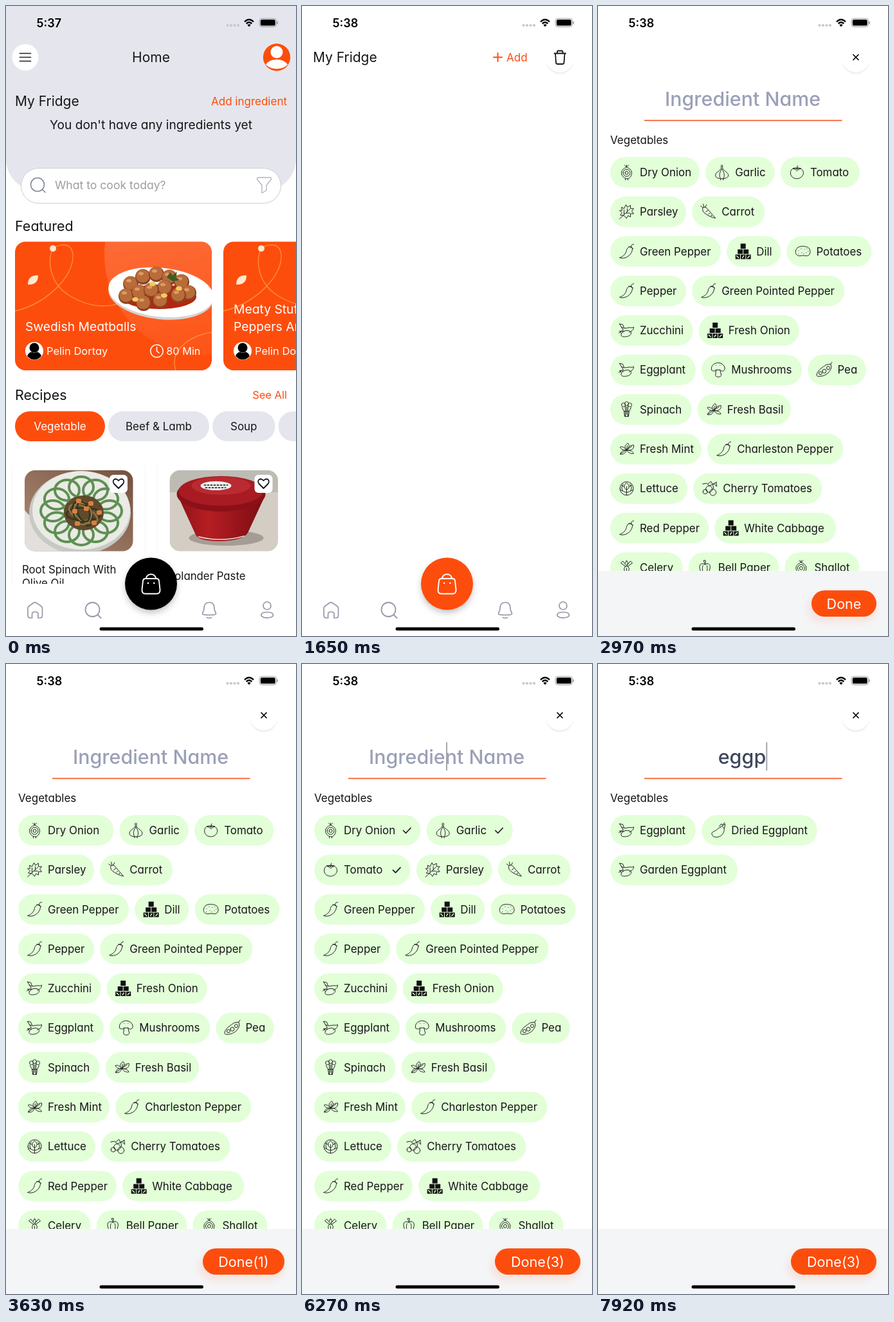
Recreate the animation shown at these times as an HTML page. Size 451 by 977 pixels, loop 8 s.

```html
<!DOCTYPE html>
<html lang="en">
<head>
<meta charset="utf-8">
<title>Recipe app</title>
<style>
  html, body { margin: 0; width: 100%; height: 100%; overflow: hidden; background: #fff; }
  svg { display: block; width: 100vw; height: 100vh; }
  text { font-family: Inter, sans-serif; font-feature-settings: "cv11"; white-space: pre; }
</style>
</head>
<body>
<svg id="stage" viewBox="0 0 451 977"></svg>
<script>
const LOOP = 8000, STEP = 330;
const ORANGE = '#fd4d0d', PALE = '#e5e6ed', INK = '#161618', GRAY = '#9698a8', CHIP = '#e2ffd8';

// Drawing helpers
const rect = (x, y, w, h, r, fill, extra = '') =>
  `<rect x="${x}" y="${y}" width="${w}" height="${h}" rx="${r}" fill="${fill}" ${extra}/>`;
const circle = (x, y, r, fill, extra = '') => `<circle cx="${x}" cy="${y}" r="${r}" fill="${fill}" ${extra}/>`;
const ellipse = (x, y, rx, ry, fill, extra = '') =>
  `<ellipse cx="${x}" cy="${y}" rx="${rx}" ry="${ry}" fill="${fill}" ${extra}/>`;
const line = (d, color, width = 1.8, extra = '') =>
  `<path d="${d}" fill="none" stroke="${color}" stroke-width="${width}" stroke-linecap="round" stroke-linejoin="round" ${extra}/>`;
const shape = (d, fill, extra = '') => `<path d="${d}" fill="${fill}" ${extra}/>`;
const text = (x, y, str, size, fill = INK, anchor = 'start', weight = 400) =>
  `<text x="${x}" y="${y}" font-size="${size}" fill="${fill}" text-anchor="${anchor}" font-weight="${weight}">${str}</text>`;
const move = (x, y, body) => `<g transform="translate(${x} ${y})">${body}</g>`;
const clipped = (id, body) => `<g clip-path="url(#${id})">${body}</g>`;
const ring = (x, y, r) => `M${x - r} ${y}a${r} ${r} 0 1 0 ${2 * r} 0a${r} ${r} 0 1 0 ${-2 * r} 0`;
const blur = 'filter="url(#blur)"';

const defs = `<defs>
  <filter id="blur" x="-50%" y="-80%" width="200%" height="260%"><feGaussianBlur stdDeviation="6"/></filter>
  <clipPath id="feature">${rect(14, 365.5, 306, 199.5, 16, '#000')}</clipPath>
  <clipPath id="photo">${rect(0, 0, 168.5, 125.5, 16, '#000')}</clipPath>
  <linearGradient id="sheen" x1=".3" y1="0" x2=".5" y2="1">
    <stop stop-color="#fff" stop-opacity=".24"/><stop offset="1" stop-color="#fff" stop-opacity=".04"/>
  </linearGradient>
  <linearGradient id="table" x1="1" y1="0" x2="0" y2="1"><stop stop-color="#75503f"/><stop offset="1" stop-color="#b08f78"/></linearGradient>
  <linearGradient id="pot" x1="0" x2="1"><stop stop-color="#8e1118"/><stop offset=".35" stop-color="#b51e22"/><stop offset="1" stop-color="#7c0c14"/></linearGradient>
</defs>`;

// Ingredient icons, centred on 0,0
const icons = {
  onion: ring(0, 1, 5.5) + ring(0, 1, 2.5) + 'M0-8C-4-6-8-4-8 1S-4 9 0 10S8 6 8 1S4-6 0-8M-3-11L0-8L3-11M0-8V-11M-2 10V12M2 10V12',
  garlic: 'M-1-11V-6C-3-2-10 0-10 5C-10 9-4 10 0 10S10 9 10 5C10 0 3-2 1-6V-11M0-5C-5 1-4 8-2 10M0-5C5 1 4 8 2 10M-2 10V12M2 10V12',
  tomato: 'M0-5C-5-8-10-5-10 1S-5 10 0 10S10 6 10 1S5-8 0-5M1-10L0-5M-6-6L0-7L6-6L2-4L0-2L-2-4Z',
  leaf: 'M-11 11L5-4M-4 6L-10 5L-7 2L-11-2L-7-2L-8-7L-4-5L-1-11L1-7L6-10L6-5L11-5L8-1L11 3L6 3L6 8L2 6L0 10ZM-4 4V-3M1 0V-5M-1 2H5',
  carrot: 'M-9-5C-8-8-4-8-2-5L11 10C5 9-5 4-8 0ZM-8-6L-12-9M-7-7L-8-12M-5-7L-3-11M-4 0L-1-2M0 4L2 2M4 7L5 5',
  pepper: 'M7-6C5-8 1-6 0-2C-1 4-5 8-11 10C-2 13 8 6 9-3C9-5 8-6 7-6M3-7C4-8 9-7 10-4M7-7C7-9 8-11 11-11',
  potato: 'M-8-6C-4-9 6-8 9-5C13 0 11 7 6 7C2 7 0 6-4 7C-14 8-13-3-8-6M-7-1h.1M-3-4h.1M-2 2h.1M2-3h.1M6-4h.1M5 2h.1M8 0h.1M-7 4h.1M1 4h.1',
  eggplant: 'M-11-10L-8-5C-5-3-2-3 2-4C6-5 8-3 11-5C11 0 7 2 4 3M-11-10L-6-9L-4-4M-8-5L-5 0M-5 2C-1-1 7 0 7 4S2 10-4 10S-10 5-5 2M-5 2L-11 1L-8 5M-6 0L-12 4',
  mushroom: 'M-10 0C-12-6-6-11 0-11S12-6 10 0C8 3 5 2 3 0H-3C-5 2-8 3-10 0M-3 0L-4 8C-4 12 5 12 5 8L3 0M-3-7h.1M3-7h.1',
  pea: 'M-12 8C-11 0-2-4 3-8L10-9L11-4C9 5 0 11-10 10ZM10-9L12-12' + ring(-6, 5, 2.5) + ring(0, 2, 3) + ring(6, -3, 2.5),
  spinach: ring(-5, -7, 3) + ring(0, -9, 3) + ring(5, -7, 3) + 'M-7-3L-4 3L-3 11H3L4 3L7-3M-2-5V11M2-5V11M0-4V8M-4 3H4',
  basil: 'M0 2C-4-2-3-6 2-9C5-5 4-2 0 2C3-4 7-6 11-6C12 0 7 3 0 2C-5 1-8 3-10 8C-5 9-2 7 0 2C3 6 7 8 11 7C9 3 5 2 0 2C-4-3-7-4-10-3C-9 1-5 2 0 2M-10 8L8-4M0 2L1-5',
  lettuce: ring(0, 0, 10.5) + 'M0 10V-3M0 6C-9 6-9-3-5-7M0 6C9 6 9-3 5-7M0 2C-5 0-5-5 0-9C5-5 5 0 0 2M-10 2L-6 4M10 2L6 4M-8-5L-4-3M8-5L4-3',
  cherry: ring(-1, 1, 5) + ring(5, 6, 5) + ring(-7, 5, 3.5) + 'M11-10L0-4L-5-8L-11-7M5-7L6 0M6-8L11-3L10-9M-3-7L2-11L4-7',
  celery: 'M-2 10L-4 2L-2-2H2L4 2L2 10ZM-2-2L-9-7L-6-10L-1-4M2-2L9-7L6-10L1-4M-2-7L0-11L2-7L0-2M0 1V9M-3 11H3',
  bell: 'M-1-5C-6-8-9-4-8 1L-6 9C-4 11-2 11 0 9C2 11 5 11 6 9L8 1C9-5 5-8 1-5ZM0-5L-2-11H1V-5M-3-3C-5 2-3 7-2 9M3-3C5 2 3 7 2 9',
  artichoke: 'M-5 10L-6-4L0-11L5-4L6 10ZM-2-8V10M-6-2L2 3L5-4M2 3V10M-6 5L0 8',
  dried: 'M4-5C7-8 11-3 9 2C7 10-3 13-8 9C-13 3-6 2-3 0C0-2 1-4 4-5M2-6L5-10L7-7L11-10L10-3M7-8L10-12',
};

// name | icon | pill width
const ingredients = `Dry Onion|onion|139
Garlic|garlic|107.5
Tomato|tomato|123
Parsley|leaf|118
Carrot|carrot|113
Green Pepper|pepper|172
Dill|blocks|84
Potatoes|potato|132
Pepper|pepper|118
Green Pointed Pepper|pepper|237
Zucchini|eggplant|128.5
Fresh Onion|blocks|156
Eggplant|eggplant|133
Mushrooms|mushroom|156
Pea|pea|90.5
Spinach|spinach|126.5
Fresh Basil|basil|145.5
Fresh Mint|basil|142
Charleston Pepper|pepper|211
Lettuce|lettuce|120
Cherry Tomatoes|cherry|200
Red Pepper|pepper|153
White Cabbage|blocks|189
Celery|celery|112.5
Bell Paper|bell|140.5
Shallot|onion|116
Cucumber|blocks|148
Fresh Thyme|blocks|163.5
Fresh Garlic|blocks|154.5
Red Onion|onion|143.5
Green Beans|blocks|163.5
Artichoke|artichoke|136.5
Dried Eggplant|dried|179.5
Garden Eggplant|eggplant|198`.split('\n').map(row => {
  const [name, icon, width] = row.split('|');
  return { name, icon, width: +width };
});

const blocks = shape('M-4-12h8v8h-8zM-8.5-3h8v7h-8zM.5-3h8v7h-8zM-12 5h7.3v7h-7.3zM-3.7 5h7.4v7h-7.4zM4.7 5h7.3v7h-7.3z', '#111') +
  line('M-10 7L-7 10M-1 10L1 7M7 10L10 7', CHIP, 1.4);

const statusBar = time =>
  text(47.5, 32.5, time, 18, '#000', 'start', 600) +
  [344.5, 350, 355.5, 361].map(x => circle(x, 30, 2.1, '#c8c8cd')).join('') +
  line('M371 24.5Q378 17.5 385 24.5M373.7 27.4Q378 23.3 382.3 27.4', '#000', 2.4, 'style="stroke-linecap:butt"') +
  shape('M375.3 29.3Q378 27 380.7 29.3L378 32.2Z', '#000') +
  rect(394, 19.3, 26.5, 13, 4, 'none', 'stroke="#9a9a9e"') + rect(395.8, 21, 23, 9.6, 2.6, '#000') +
  rect(421.4, 23.8, 1.5, 4.4, .8, '#9a9a9e');

const homeIndicator = rect(145.5, 963.5, 161.5, 5, 2.5, '#000');

const tabBar = bag =>
  rect(0, 896, 451, 81, 0, '#fff') +
  line('M34 934.5Q34 932 36 930.5L43 925.5Q45 924.3 47 925.5L54.5 930.5Q56.5 932 56.5 934.5V945Q56.5 949 52.5 949H50V943Q50 939.5 45.3 939.5T40.5 943V949H38Q34 949 34 945Z', GRAY, 1.7) +
  line(ring(134.5, 936, 11) + 'M142.5 944L147.5 949', GRAY) +
  line('M316 925C309 925 308 930 308 934C308 939 305.5 940 305.5 942.5C305.5 944 308 944.5 316 944.5S326.5 944 326.5 942.5C326.5 940 324 939 324 934C324 930 323 925 316 925M312.5 948.5Q316 950 319.5 948.5', GRAY, 1.7) +
  line(ring(406, 930, 6) + 'M397 944.5C397 938.5 415.5 938.5 415.5 944.5S397 950 397 944.5', GRAY, 1.7) +
  circle(225.5, 901, 39, '#000', `opacity=".28" ${blur}`) + circle(225.5, 896, 40.5, bag) +
  line('M218 888C218 879 233 879 233 888M217 888H234Q237.5 888 238 891.5L239.5 905Q240 911.5 234 911.5H217Q211 911.5 211.5 905L213 891.5Q213.5 888 217 888', '#fff', 1.9) +
  circle(221, 895, 1.3, '#fff') + circle(230.3, 895, 1.3, '#fff');

const roundButton = icon => circle(401, 84.5, 21.5, '#000', 'opacity=".05"') + circle(401, 80.5, 22, '#fff') + icon;

const meatballs = [[194, 431], [213, 420], [234, 416], [254, 421], [273, 428], [187, 450], [284, 445], [207, 444],
  [247, 437], [226, 441], [268, 449], [214, 461], [240, 457]];

const plate = ellipse(241, 447, 82, 39, '#d9d3d0', 'transform="rotate(6 241 447)"') +
  ellipse(241, 444, 82, 38, '#fff', 'transform="rotate(6 241 444)"') +
  ellipse(238, 451, 58, 19, '#b5260f') +
  meatballs.map(([x, y]) => circle(x, y, 12, '#8a4220') + circle(x - .5, y - 1.5, 10.5, '#b96c3a') +
    ellipse(x - 3, y - 5, 4, 2.5, '#dc9c63')).join('') +
  [[228, 431], [246, 449], [201, 455], [269, 438]].map(([x, y]) => ellipse(x, y, 5, 3.5, '#f4ca62')).join('') +
  shape('M250 421L255 413L259 418L266 412L264 421L270 425L260 427Z', '#3f5c24');

const featureCard = (x, titles, extra = '') => move(x - 14, 0, clipped('feature',
  rect(14, 365, 306, 200, 0, ORANGE) + circle(308, 386, 155, 'url(#sheen)') +
  line('M14 473C62 462 106 420 104 386C102 364 80 370 73 376C64 392 66 430 100 450S165 470 200 452M326 505C285 510 250 535 266 570', '#ffa14d', 1.4, 'opacity=".75"') +
  circle(73, 376, 5, '#ffe8cd') + shape('M34 432C34 422 40 417 50 418C50 427 45 433 34 432Z', '#ffe8cd') +
  extra +
  titles.map((title, i) => text(30, 504 - 27 * (titles.length - 1 - i), title, 19.3, '#fff')).join('') +
  circle(44, 535, 14, '#fff') + circle(44, 530, 7.5, '#000') + shape('M33 543Q35 537 40 536.5Q44 539 48 536.5Q53 537 55 543Q50 548.5 44 548.5T33 543', '#000') +
  text(63, 541, 'Pelin Dortay', 16.5, '#fff') +
  line(ring(234.5, 535, 9.8) + 'M234.5 529V535L238 538', '#fff', 1.5) + text(302.5, 541, '80 Min', 16.3, '#fff', 'end')));

const pastaPhoto = rect(0, 0, 169, 126, 0, 'url(#table)') + shape('M0 62L60 126H0Z', '#e3dfdc') +
  ellipse(86, 66, 79, 64, '#c6c9c4') + ellipse(88, 62, 76, 61, '#e9ebe4') +
  Array.from({ length: 12 }, (_, i) => {
    const a = i * Math.PI / 6;
    return ellipse(88 + 44 * Math.cos(a), 63 + 37 * Math.sin(a), 19, 16, 'none', 'stroke="#5f8f54" stroke-width="4"');
  }).join('') +
  ellipse(92, 66, 31, 27, '#5f4a2c') +
  Array.from({ length: 7 }, (_, i) => ellipse(92, 68, 27 - 3 * i, 10 + i, 'none', `stroke="${i % 2 ? '#8e7443' : '#36351f'}" stroke-width="2.5" transform="rotate(${i * 27} 92 66)"`)).join('') +
  [[80, 44], [99, 48], [74, 60], [112, 62], [92, 56], [104, 78], [78, 79]].map(([x, y]) => rect(x, y, 8, 7, 2, '#d9803f')).join('');

const potPhoto = rect(0, 0, 169, 126, 0, '#d3cdc3') + rect(0, 0, 169, 34, 0, '#bcbcb5') + ellipse(88, 105, 58, 12, '#a59d94') +
  shape('M12 38L40 99Q44 110 78 110Q116 109 122 96L149 38Z', 'url(#pot)') +
  ellipse(80, 37, 69, 27, '#8c1019') + ellipse(80, 32, 66, 23, '#a91b22') + ellipse(80, 24, 46, 14, '#b92a31') +
  ellipse(72, 24, 24, 7, '#f0eeee') + line('M54 23H90M56 27H87', '#444', 1.8, 'stroke-dasharray="2 3"') +
  line('M45 103Q80 112 116 102', '#e8ddd6', 1.5);

const recipeCard = (x, photo) =>
  rect(x - 20, 703, 208, 290, 14, '#000', 'opacity=".035"') + rect(x - 19, 701, 206, 290, 14, '#fff') +
  move(x, 720, clipped('photo', photo)) + rect(x + 132, 727, 28, 28, 6, '#fff') +
  line(`M${x + 146} 748L${x + 139} 741C${x + 135} 736 ${x + 141} 730 ${x + 146} 736C${x + 151} 730 ${x + 157} 736 ${x + 153} 741Z`, '#111', 1.8);

const pill = (x, w, label, active) =>
  rect(x, 628.5, w, 46.5, 23.2, active ? ORANGE : PALE) + text(x + w / 2, 658, label, 17, active ? '#fff' : INK, 'middle');

const homePage = () =>
  rect(0, 0, 451, 977, 0, '#fff') + rect(0, -60, 451, 347, 50, PALE) +
  circle(30, 79.5, 20.5, '#fff') + line('M21.5 73.5H38.5M21.5 79.5H38.5M21.5 85.5H38.5', '#222', 1.7) +
  text(225.5, 86.5, 'Home', 21, INK, 'middle') +
  circle(421, 79.5, 21.2, ORANGE) + shape('M404 91Q409 83 421 83T438 91Q431 97.5 421 97.5T404 91', '#fff') +
  circle(421, 71.5, 10.5, '#fff', `stroke="${ORANGE}" stroke-width="2"`) +
  text(14, 155, 'My Fridge', 21) + text(437, 154, 'Add ingredient', 17, ORANGE, 'end') +
  text(225.5, 191, "You don't have any ingredients yet", 19.2, INK, 'middle') +
  rect(23.5, 251.5, 404, 54.5, 27.2, '#fff', 'stroke="#c9cad6"') +
  line(ring(49, 277, 10.5) + 'M57 285L61 289', '#85889a', 1.6) + text(76, 284, 'What to cook today?', 17.6, '#9c9ca2') +
  line('M392 266H411Q413.5 267 412 269.5L405 278V286L398 290V278L391 269.5Q389.5 267 392 266', '#b3b4be', 1.4) +
  text(14, 349, 'Featured', 21.5) +
  featureCard(14, ['Swedish Meatballs'], plate) + featureCard(338, ['Meaty Stuffed', 'Peppers And']) +
  text(14, 611, 'Recipes', 21.5) + text(437, 609, 'See All', 16.5, ORANGE, 'end') +
  pill(14, 140, 'Vegetable', true) + pill(159, 157, 'Beef &amp; Lamb') + pill(321, 97.5, 'Soup') + pill(423.5, 110, '') +
  recipeCard(29, pastaPhoto) + recipeCard(254.5, potPhoto) +
  text(25, 880, 'Root Spinach With', 16.8) + text(25, 901, 'Olive Oil', 16.8) + text(250, 890, 'Colander Paste', 16.8) +
  tabBar('#000');

const fridgePage = () =>
  rect(0, 0, 451, 977, 0, '#fff') + text(17, 86.5, 'My Fridge', 21) +
  line('M304.5 73V86M298 79.5H311', ORANGE, 2) + text(318, 85.5, 'Add', 17, ORANGE) +
  roundButton(line('M392.5 73.5H410M397 73V71Q397 69.5 398.5 69.5H404Q405.5 69.5 405.5 71V73M394 74L395 87.5Q395 90 397.5 90H405Q407.5 90 407.5 87.5L408.5 74', INK, 1.8)) +
  tabBar(ORANGE);

function chips(query, selected) {
  let x = 19, y = 234.3;
  return ingredients.filter(item => item.name.toLowerCase().includes(query)).map(({ name, icon, width }) => {
    const grown = selected[name] || 0, w = width + 26.5 * grown;
    if (x > 19 && x + w > 430) { x = 19; y += 61.3; }
    const chip = rect(0, 0, w, 47.3, 23.6, CHIP) +
      move(25.5, 23.5, icon === 'blocks' ? blocks : line(icons[icon], '#222', 1)) + text(46, 29.7, name, 16.9) +
      (grown === 1 ? line(`M${w - 27} 24L${w - 23} 28L${w - 15.5} 20`, INK, 1.6) : '');
    const placed = move(x, y, chip);
    x += w + 9.2;
    return y < 876 ? placed : '';
  }).join('');
}

function pickerPage({ query, placeholder, caret, selected }) {
  const count = Object.values(selected).filter(Boolean).length;
  const left = [332, 306, 301, 300][count], width = 433 - left;
  return rect(0, 0, 451, 977, 0, '#fff') +
    roundButton(line('M397 75.5L405 83.5M405 75.5L397 83.5', '#000', 1.7)) +
    (placeholder ? text(225, 154.5, 'Ingredient Name', 30.4, '#9ba0b7', 'middle', 500) : '') +
    text(224, 155, query, 30.5, '#3f475c', 'middle', 500) +
    (caret ? rect(caret - 1, 121, 2, 44.5, 1, '#a4a6b0') : '') +
    rect(72, 176.7, 307.5, 1.6, 0, '#f2511f') + text(19, 214, 'Vegetables', 17) +
    chips(query, selected) + rect(0, 876, 451, 101, 0, '#f4f5f7') +
    rect(left - 6, 912, width + 6, 44, 22, ORANGE, `opacity=".1" ${blur}`) +
    rect(left, 906.3, width, 40.7, 20.3, ORANGE) +
    text(left + width / 2, 935, count ? `Done(${count})` : 'Done', 21.6, '#fff', 'middle');
}

// 0 before the tap, part way on the tap, 1 afterwards
const grow = (step, tap) => step < tap ? 0 : step === tap ? .35 : 1;

function render(step) {
  const picker = () => pickerPage({
    query: step < 21 ? '' : step < 22 ? 'e' : 'eggp',
    placeholder: step < 22,
    caret: { 19: 225, 20: 225, 21: 233.3, 24: 262.3 }[step],
    selected: { 'Dry Onion': grow(step, 11), Tomato: step < 14 ? 0 : 1, Garlic: grow(step, 16) },
  });
  let page;
  if (step < 5) page = homePage();
  else if (step < 8) page = fridgePage();
  else if (step > 8) page = picker();
  else {
    const progress = .866;
    page = move(-progress * 150, 0, fridgePage()) + rect(0, 0, 451, 977, 0, '#000', `opacity="${.095 * progress}"`) +
      move(451 * (1 - progress), 0, picker());
  }
  return defs + page + statusBar(step < 5 ? '5:37' : '5:38') + homeIndicator;
}

const stage = document.getElementById('stage');
let shown = -1;
function frame(now) {
  const step = Math.floor(now % LOOP / STEP);
  if (step !== shown) stage.innerHTML = render(shown = step);
  requestAnimationFrame(frame);
}
frame(performance.now());
</script>
</body>
</html>
```
